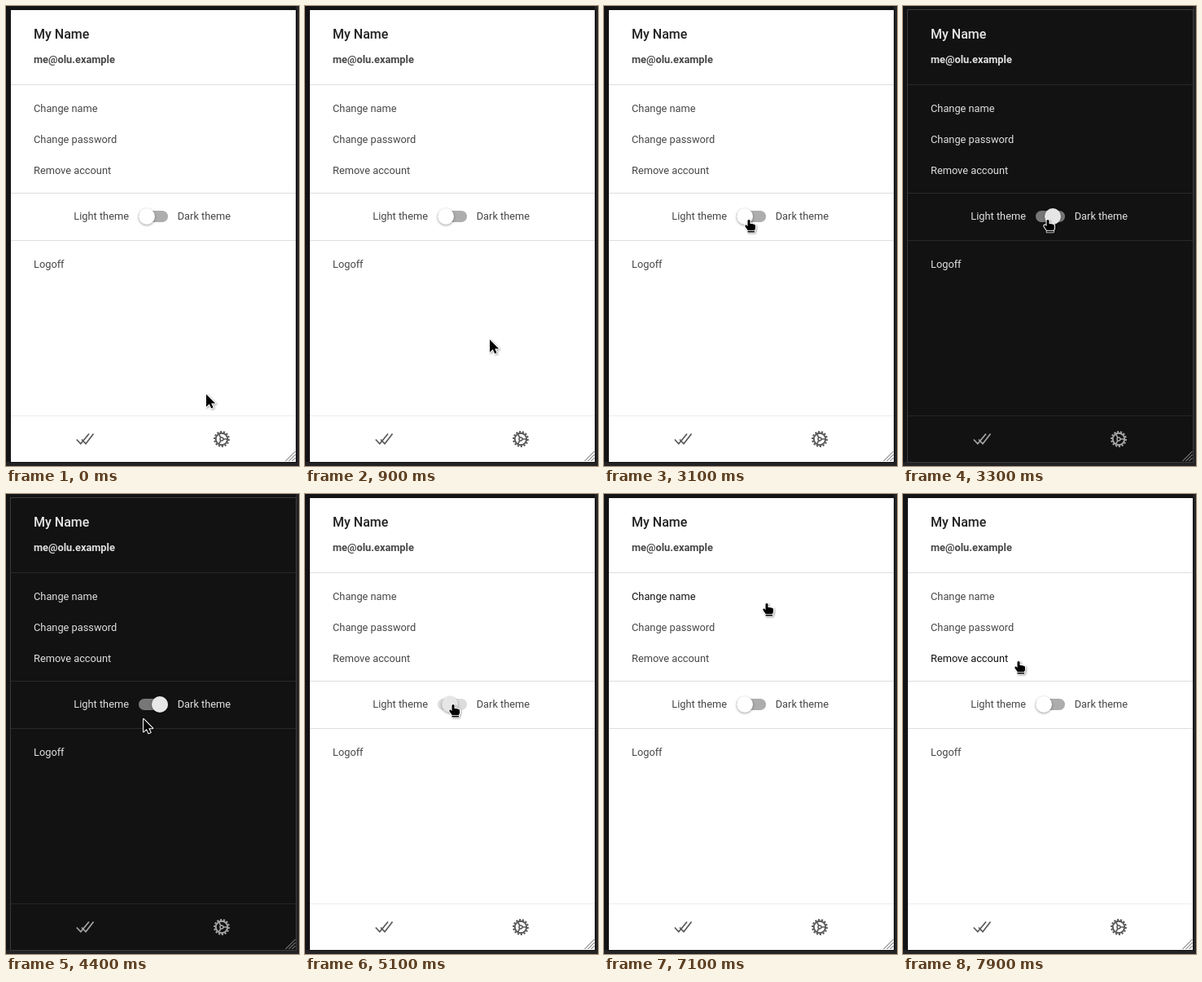
An HTML page that plays this animation: 360x564 px, repeating every 8 s.

```html
<!DOCTYPE html>
<html lang="en">
<head>
<meta charset="utf-8">
<title>Account settings</title>
<style>
html, body { margin: 0; width: 100%; height: 100%; overflow: hidden; background: #131315; }
svg {
  display: block;
  --bg: #fff; --edge: #131315; --line: #dedede; --foot: #ececec;
  --title: #202020; --text: #474747; --hover: #111; --icon: #585858;
  --track: #adadad; --thumb: #fff;
}
svg.dark {
  --bg: #121212; --edge: #3b3b3b; --line: #292929; --foot: #262626;
  --title: #e6e6e6; --text: #e0e0e0; --hover: #fff; --icon: #a6a6a6;
  --track: #777; --thumb: #e7e7e7;
}
svg.sliding { --thumb: #e6e6e6; }
svg.sliding:not(.dark) { --track: #dcdcdc; }
text { font: 12.8px Roboto, sans-serif; fill: var(--text); }
.title { font-size: 16px; font-weight: 500; fill: var(--title); }
.mail { font-weight: 700; }
.hover { fill: var(--hover); }
.icon { fill: none; stroke: var(--icon); }
#thumb { fill: var(--thumb); filter: drop-shadow(0 1px 1.5px rgba(0, 0, 0, .4)); }
.cursor { fill: #000; stroke: #fff; stroke-width: 2; paint-order: stroke; stroke-linejoin: round;
  filter: drop-shadow(1px 1px 1px rgba(0, 0, 0, .35)); }
</style>
</head>
<body>
<svg id="stage" width="360" height="564" viewBox="0 0 360 564">
  <path d="M356 0h4v564H0v-5h356z" fill="#232325"/>
  <rect x="5.5" y="4.5" width="351" height="555" style="fill:var(--bg);stroke:var(--edge)"/>
  <path d="M6 96.5h350M6 229.5h350M6 287.5h350" style="stroke:var(--line)"/>
  <path d="M6 502.5h350" style="stroke:var(--foot)"/>

  <text class="title" x="34" y="40">My Name</text>
  <text class="mail" x="34" y="70">me@olu.example</text>
  <text class="row" x="34" y="130">Change name</text>
  <text class="row" x="34" y="168">Change password</text>
  <text class="row" x="34" y="206">Remove account</text>
  <text x="83.3" y="262">Light theme</text>
  <text x="210.7" y="262">Dark theme</text>
  <text class="row" x="34" y="321">Logoff</text>

  <rect x="163" y="251" width="36" height="14" rx="7" style="fill:var(--track)"/>
  <circle id="thumb" cy="258" r="10"/>

  <path class="icon" stroke-width="1.7" d="M86.8 531.5l5 5.3 10.2-12.3M93 531.5l5 5.3 9.5-12.3"/>
  <g class="icon" transform="translate(265 531)">
    <circle r="7.2" stroke-width="1.9"/>
    <circle r="8.9" stroke-width="2" pathLength="28" stroke-dasharray="1.1 .9"/>
    <circle r="2" stroke-width="1.5"/>
    <path stroke-width="1.7" d="M2 0H7M-1 1.7L-3.5 6.1M-1 -1.7L-3.5 -6.1"/>
  </g>
  <path class="icon" d="M343.5 558l12-12M347.5 558l8-8M351.5 558l4-4"/>

  <path id="arrow" class="cursor" d="M0 0V15.5L3.8 12 6.2 17.3 8.6 16.3 6.2 11.2H11.2z"/>
  <g id="hand" class="cursor">
    <path d="M-1.5 1Q0-.8 1.5 1V5L5 5.3 8 6.5V11L6.5 13.5H-1L-4.5 8.5Q-5.2 6.2-3.2 6.5L-1.5 8z"/>
    <path d="M-1.5 13.8H7V15.5H-1.5z" stroke-width="1.4"/>
  </g>
</svg>
<script>
const LOOP = 8000, STEP = 100, TO_DARK = 3300, TO_LIGHT = 5100;
// time, x, y of the pointer's hot spot
const path = [
  [0, 246, 476], [400, 246, 476], [1500, 203, 320], [1800, 199, 311], [2300, 197, 304],
  [3000, 178, 262], [3400, 178, 262], [3800, 169, 276], [4500, 169, 276],
  [4900, 182, 258], [5300, 182, 258], [5900, 220, 206], [6300, 226, 188],
  [6400, 225, 168], [6800, 212, 130], [7100, 200, 134], [7700, 145, 203], [7900, 142, 205]
];
const get = id => document.getElementById(id);
const stage = get('stage'), thumb = get('thumb'), arrow = get('arrow'), hand = get('hand');
const rows = [...document.querySelectorAll('.row')];

function pointer(t) {
  const i = path.findIndex(p => p[0] >= t);
  if (i <= 0) return path[0].slice(1);
  const [t0, x0, y0] = path[i - 1], [t1, x1, y1] = path[i];
  const u = (t - t0) / (t1 - t0), k = u * u * (3 - 2 * u);
  return [x0 + (x1 - x0) * k, y0 + (y1 - y0) * k].map(Math.round);
}

const inRow = (row, y) => Math.abs(y - row.getAttribute('y') + 4.5) < 19;

function draw(t) {
  const dark = t >= TO_DARK && t < TO_LIGHT;
  const sliding = t === TO_DARK || t === TO_LIGHT;
  stage.classList.toggle('dark', dark);
  stage.classList.toggle('sliding', sliding);
  thumb.setAttribute('cx', sliding ? (dark ? 184 : 178) : dark ? 189 : 173);

  const [x, y] = pointer(t), lastY = pointer(Math.max(0, t - STEP))[1];
  // row highlight trails the pointer by one step
  rows.forEach(row => row.classList.toggle('hover', inRow(row, lastY)));
  const onSwitch = x > 162 && x < 200 && y > 247 && y < 269;
  const pointing = onSwitch || rows.some(row => inRow(row, y));
  for (const [el, shown] of [[hand, pointing], [arrow, !pointing]]) {
    el.setAttribute('transform', `translate(${x} ${y})`);
    el.style.display = shown ? '' : 'none';
  }
}

function tick() {
  draw(Math.floor(performance.now() % LOOP / STEP) * STEP);
  requestAnimationFrame(tick);
}
tick();
</script>
</body>
</html>
```
